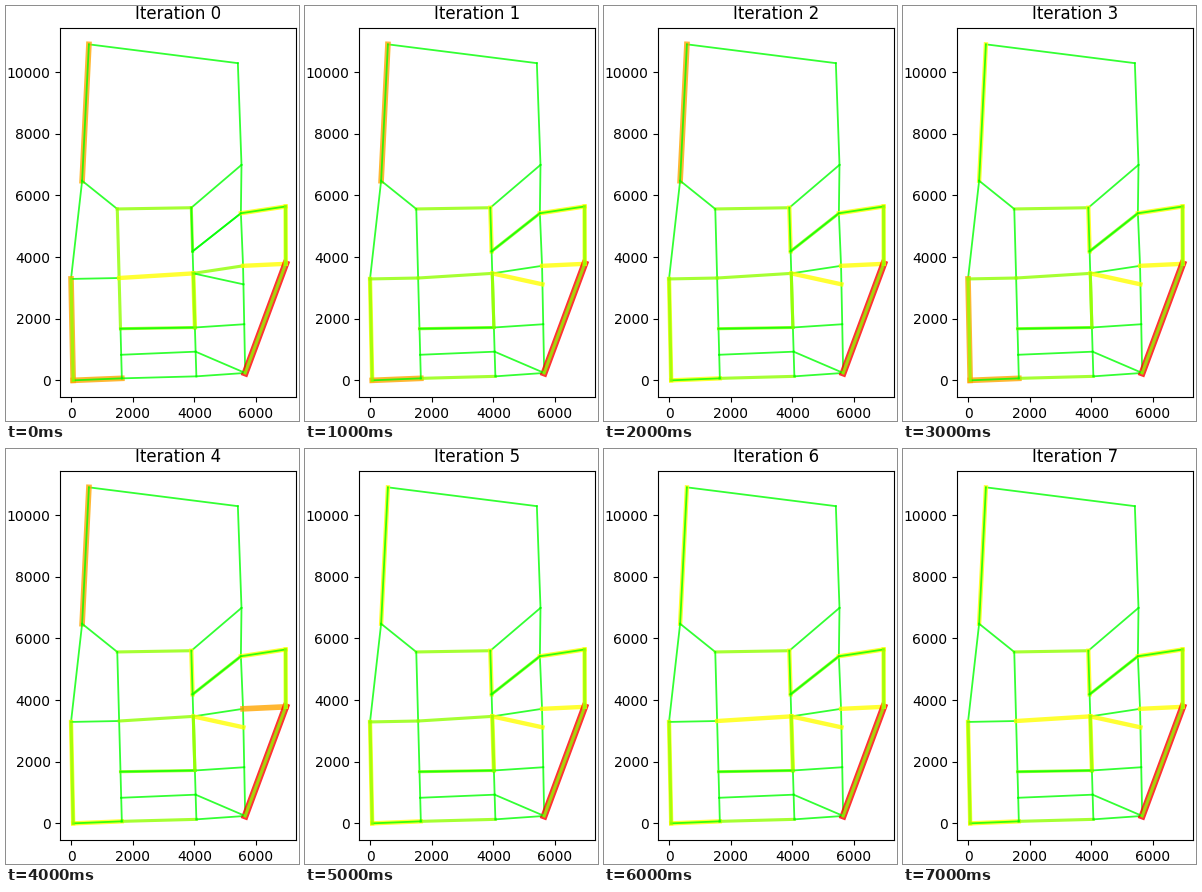
Animation of 293 by 415 pixels, one loop 8 s. Source, as a matplotlib script:

```python
import matplotlib.pyplot as plt
from matplotlib.animation import FuncAnimation

W, H, DPI = 293, 415, 100
STEPS = 8
# Load classes, free to jammed
COLORS = ["lime", "#90ff00", "yellow", "orange", "red"]

# Corners of the road network, in metres
nodes = {
    1: (580, 10900), 2: (5412, 10290), 3: (360, 6475), 6: (5530, 6990),
    7: (6960, 5640), 8: (5510, 5420), 12: (0, 3290), 13: (70, 0),
    18: (6965, 3780),
}


def add_column(x0, lean, heights):
    """Place nodes on a straight street that leans to the left."""
    for n, y in heights.items():
        nodes[n] = (x0 - lean * y, y)


add_column(1650, 0.027, {4: 5560, 11: 3320, 14: 1675, 23: 830, 24: 65})
add_column(4070, 0.030, {5: 5600, 9: 4185, 10: 3470, 15: 1715, 22: 930, 21: 130})
add_column(5655, 0.020, {16: 3715, 17: 3115, 19: 1820, 20: 240})

STREETS = """1-2-6-8-16-17-19-20 1-3-12-13-24-21-20 3-4-5-6 4-11-14-23-24
5-9-10-15-22-21 12-11-10-16-18-20 10-17 14-15-19 23-22-20 9-8-7-18""".split()

# What each iteration changes: class -> links that move to it
CHANGES = {
    0: {1: "4-5 4-11 5-9 10-16 11-14 14-15", 2: "8-7 7-18 11-10 10-15 16-18",
        3: "1-3 12-13 13-24", 4: "18-20"},
    1: {0: "4-11 11-14 10-16", 1: "12-11 9-8 11-10 10-15 24-21",
        2: "12-13 5-9 10-17"},
    2: {2: "13-24"},
    3: {2: "1-3", 3: "12-13 13-24"},
    4: {0: "12-11", 2: "12-13 13-24", 3: "1-3 16-18"},
    5: {1: "12-11", 2: "1-3 16-18 10-15"},
    6: {0: "12-11", 2: "11-10"},
}
# Lighter traffic in the opposite direction
OPPOSITE = {0: "1-3 5-9 8-7 9-8 13-24 14-15", 1: "7-18 10-15 12-13 18-20"}

fig = plt.figure(figsize=(W / DPI, H / DPI), dpi=DPI, facecolor="white")
ax = fig.add_axes([54.3 / W, 23.85 / H, 236 / W, 369.6 / H])
ax.set_xlim(-348, 7308)
ax.set_ylim(-545, 11445)
ax.set_xticks(range(0, 7000, 2000))
ax.set_yticks(range(0, 11000, 2000))
title = ax.set_title("")


def add_link(link, z):
    xs, ys = zip(*(nodes[int(n)] for n in link.split("-")))
    return ax.plot(xs, ys, alpha=0.8, zorder=z)[0]


def set_class(line, c):
    line.set(color=COLORS[c], linewidth=1.3 + 0.92 * c)


lines = {}
for street in STREETS:
    stops = street.split("-")
    for a, b in zip(stops, stops[1:]):
        lines[f"{a}-{b}"] = add_link(f"{a}-{b}", 2)

for c, links in OPPOSITE.items():
    for link in links.split():
        set_class(add_link(link, 3), c)


def loads(step):
    """Class of every link after the changes up to this iteration."""
    state = dict.fromkeys(lines, 0)
    for i in range(step + 1):
        for c, links in CHANGES.get(i, {}).items():
            state.update(dict.fromkeys(links.split(), c))
    return state


def update(step):
    title.set_text(f"Iteration {step}")
    for link, c in loads(step).items():
        set_class(lines[link], c)
    return [title, *lines.values()]


anim = FuncAnimation(fig, update, frames=STEPS, interval=1000, repeat=True)
plt.show()
```
